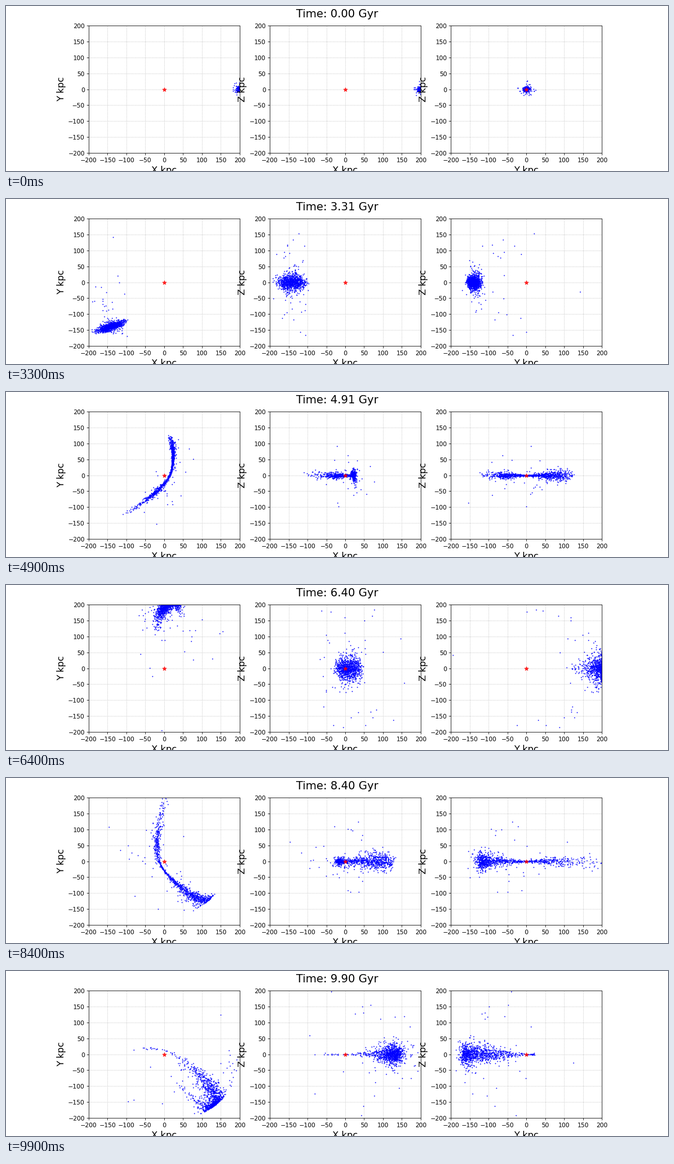
Animation of 1280x320 px, one loop 10 s. Source, as a matplotlib script:

```python
import numpy as np
import matplotlib.pyplot as plt
from matplotlib.animation import FuncAnimation

FRAMES, INTERVAL = 100, 100
SUBSTEPS = 60                      # leapfrog steps per frame
N_STARS = 1000
N_FAST, FAST_SIGMA = 45, 22.0      # unbound stars and their speed (kpc/Gyr)
R_PERI, R_APO, SOFT = 13.0, 200.0, 2.0       # kpc
PERIOD, ADVANCE = 3.22, np.radians(224)      # radial period (Gyr), apsidal advance
CORE, CORE_GM = 2.2, 750.0         # Plummer cluster: kpc, kpc^3 / Gyr^2
LIMIT = 200


# ---- host halo: softened power-law force ~ r^-n -------------------------

def potential(r, n):
    return -(r * r + SOFT * SOFT) ** (-(n - 1) / 2) / (n - 1)


def orbit(n):
    """Radial period, apsidal advance and angular momentum for unit strength."""
    p1, p2 = potential(R_PERI, n), potential(R_APO, n)
    L2 = 2 * (p2 - p1) / (R_PERI ** -2 - R_APO ** -2)
    energy = p2 + L2 / (2 * R_APO ** 2)
    steps = 4000
    th = (np.arange(steps) + 0.5) * np.pi / steps
    half = (R_APO - R_PERI) / 2
    r = (R_APO + R_PERI) / 2 - half * np.cos(th)
    v2 = 2 * (energy - potential(r, n)) - L2 / r ** 2
    dt = half * np.sin(th) / np.sqrt(np.maximum(v2, 1e-14)) * np.pi / steps
    return 2 * dt.sum(), 2 * (np.sqrt(L2) * dt / r ** 2).sum(), np.sqrt(L2)


def solve_halo():
    """Find the slope and strength that give the wanted rosette."""
    lo, hi = 0.6, 1.7
    for _ in range(40):
        n = (lo + hi) / 2
        if orbit(n)[1] < ADVANCE:
            lo = n
        else:
            hi = n
    period, _, L = orbit(n)
    k = (period / PERIOD) ** 2
    return n, k, L * np.sqrt(k) / R_APO


SLOPE, STRENGTH, V_APO = solve_halo()


# ---- star cluster -------------------------------------------------------

def make_cluster():
    rng = np.random.default_rng(12)
    u = rng.uniform(0.002, 0.994, N_STARS)
    radius = CORE / np.sqrt(u ** (-2 / 3) - 1)
    direction = rng.normal(size=(N_STARS, 3))
    direction /= np.linalg.norm(direction, axis=1)[:, None]
    pos = direction * radius[:, None]
    sigma = np.sqrt(CORE_GM / (6 * np.hypot(radius, CORE)))
    sigma[-N_FAST:] = FAST_SIGMA
    vel = rng.normal(size=(N_STARS, 3)) * sigma[:, None]
    pos[0] = vel[0] = 0            # star 0 traces the cluster centre
    return pos + [R_APO, 0, 0], vel + [0, V_APO, 0]


def acceleration(pos, t):
    r2 = (pos ** 2).sum(axis=1, keepdims=True) + SOFT ** 2
    acc = -STRENGTH * pos * r2 ** (-(SLOPE + 1) / 2)
    if t < PERIOD / 2:             # cluster dissolves at first pericentre
        d = pos - pos[0]
        acc -= CORE_GM * d * ((d ** 2).sum(axis=1, keepdims=True) + CORE ** 2) ** -1.5
    return acc


def simulate(times):
    pos, vel = make_cluster()
    t, snaps = 0.0, [pos.copy()]
    acc = acceleration(pos, t)
    for t_next in times[1:]:
        dt = (t_next - t) / SUBSTEPS
        for _ in range(SUBSTEPS):
            vel += acc * dt / 2
            pos += vel * dt
            t += dt
            acc = acceleration(pos, t)
            vel += acc * dt / 2
        snaps.append(pos.copy())
    return snaps


times = 0.01 + 0.0999 * np.arange(FRAMES)
times[0] = 0
snaps = simulate(times)


# ---- figure -------------------------------------------------------------

plt.rcParams.update({"font.family": "DejaVu Sans", "font.size": 16})
fig, axes = plt.subplots(1, 3, figsize=(16, 4), dpi=80)
fig.subplots_adjust(left=0.125, right=0.9, bottom=0.11, top=0.88, wspace=0.2)
title = fig.suptitle("Time: 0.00 Gyr")

PLANES = [(0, 1), (0, 2), (1, 2)]
ticks = np.arange(-LIMIT, LIMIT + 1, 50)
dots = []
for ax, (i, j) in zip(axes, PLANES):
    ax.set(xlim=(-LIMIT, LIMIT), ylim=(-LIMIT, LIMIT), xticks=ticks, yticks=ticks)
    ax.set_xlabel("XYZ"[i] + " kpc")
    ax.set_ylabel("XYZ"[j] + " kpc")
    ax.tick_params(labelsize=10.5)
    ax.grid(linestyle=":")
    dots += ax.plot([], [], "o", color="blue", ms=1.8, mew=0)
    ax.scatter(0, 0, s=50, marker="*", color="red", alpha=0.8, zorder=3)


def draw(frame):
    pos = snaps[frame]
    for dot, (i, j) in zip(dots, PLANES):
        dot.set_data(pos[:, i], pos[:, j])
    title.set_text(f"Time: {times[frame]:.2f} Gyr")
    return [*dots, title]


anim = FuncAnimation(fig, draw, frames=FRAMES, interval=INTERVAL,
                     repeat=True, repeat_delay=0)
plt.show()
```
